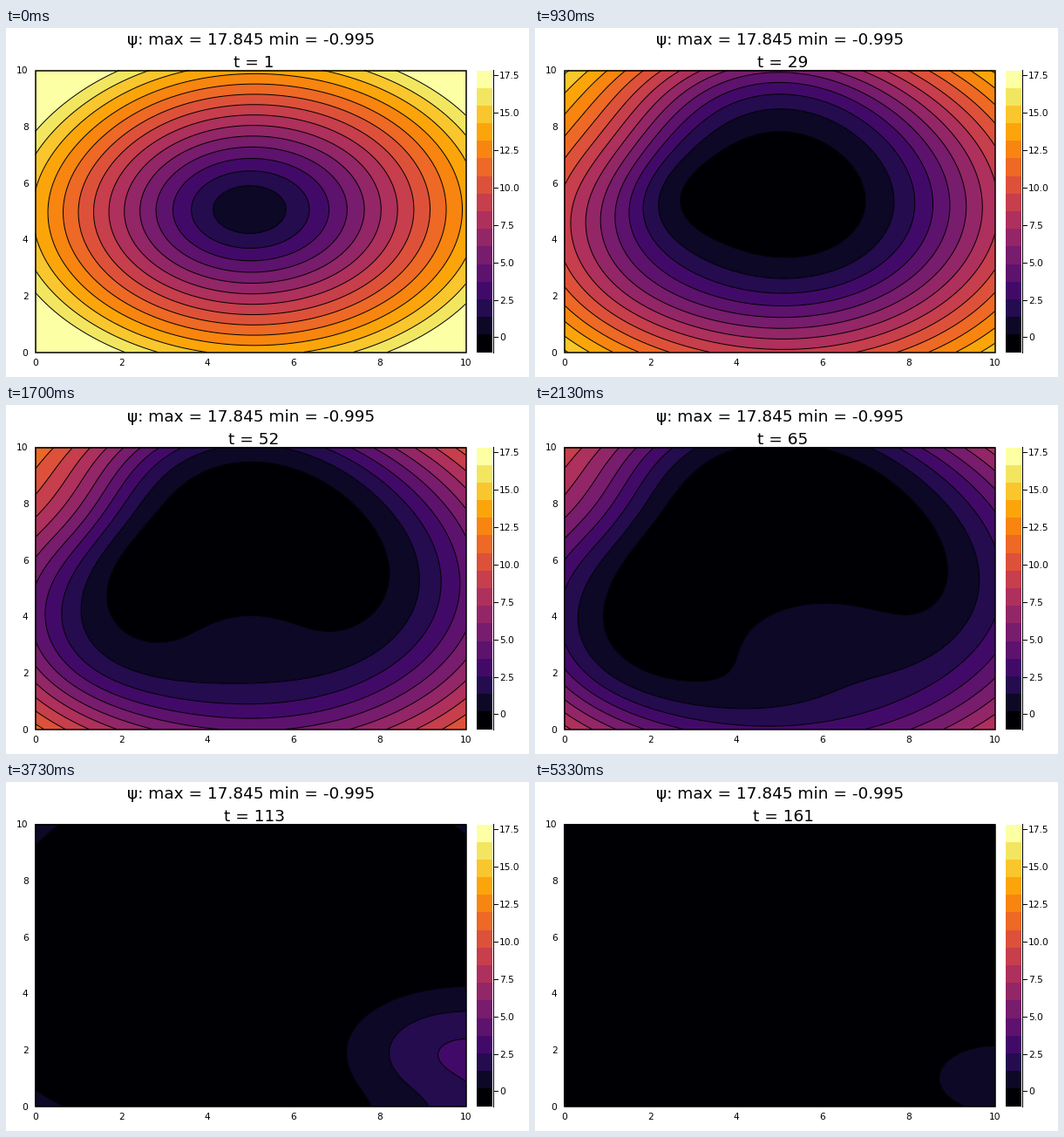
Recreate the animation shown at these times as a matplotlib script. Size 600 by 400 pixels, loop 5.36 s.

```python
import numpy as np
import matplotlib.pyplot as plt
from matplotlib.animation import FuncAnimation
from matplotlib.patches import Rectangle

LOOP_MS, TICK_MS, STEPS = 5360, 20, 161
LEFT, RIGHT, TOP, BOTTOM = 33.5, 527.5, 48.5, 371.5
LOW, HIGH, BANDS = -0.995, 17.845, 16
PX = 0.72  # points per pixel at 100 dpi

plt.rcParams["font.family"] = "DejaVu Sans"
COLORS = plt.cm.inferno(np.linspace(0, 1, BANDS))
x, y = np.meshgrid(np.linspace(0, 10, 90), np.linspace(0, 10, 70))
px = LEFT + x / 10 * (RIGHT - LEFT)
py = BOTTOM - y / 10 * (BOTTOM - TOP)

# Distance from the ignition point, rounded at the tip
CONE = np.sqrt((x - 4.95) ** 2 + (y - 5.06) ** 2 + 0.09) - 0.03 * (x - 5)


def bump(cx, cy, sx, sy):
    return np.exp(-((x - cx) / sx) ** 2 / 2 - ((y - cy) / sy) ** 2 / 2)


HEAD = bump(4.8, 9.0, 2.2, 2.5)
CORE = bump(3.3, 5.3, 1.0, 1.0)
FLANK = bump(1.5, 2.8, 1.6, 1.6)
LAG = bump(1.0, 7.8, 1.7, 1.7)


def field(t):
    """Cone swept outwards by a spreading front, in units of colour bands."""
    age = t - 1
    early = 1 - np.exp(-age / 20)
    late = 1 - np.exp(-(age / 60) ** 2)
    pulse = np.exp(-((t - 60) / 40) ** 2)
    shift = (0.057 * age + early * (1.5 * HEAD + 0.9 * CORE)
             + late * FLANK - 0.9 * pulse * LAG)
    front = 2.77 * 0.71 * np.logaddexp(0, (CONE - shift - 0.5) / 0.71)

    # A slow patch that drifts to the lower right and fades
    strength = 2.9 * np.exp(-((t - 108) / 60) ** 2)
    patch = bump(min(10, 5.2 + 0.078 * (t - 55)), 3.4 - 0.02 * (t - 41), 1.7, 1.5)
    return np.clip(front + strength * early * patch, 0.01, BANDS - 0.01)


fig = plt.figure(figsize=(6, 4), dpi=100, facecolor="white")
ax = fig.add_axes([0, 0, 1, 1])
ax.set_xlim(0, 600)
ax.set_ylim(400, 0)
ax.axis("off")


def label(x, y, s, size=10.67, ha="left"):
    return ax.text(x, y, s, fontsize=size * PX, color="black", ha=ha, va="baseline")


# Frame and axis labels
ax.add_patch(Rectangle((LEFT, TOP), RIGHT - LEFT, BOTTOM - TOP, fill=False,
                       edgecolor="black", linewidth=1.5 * PX, zorder=5))
for v in range(0, 11, 2):
    label(LEFT + v / 10 * (RIGHT - LEFT), 387, str(v), ha="center")
    label(25.5, BOTTOM - v / 10 * (BOTTOM - TOP) + 4, str(v), ha="right")

# Colour bar
step = (BOTTOM - TOP) / BANDS
for i, c in enumerate(COLORS):
    ax.add_patch(Rectangle((540, BOTTOM - (i + 1) * step), 18, step, facecolor=c,
                           linewidth=0, antialiased=False))
ax.plot([558.5, 558.5], [TOP - 0.5, BOTTOM], color="black", lw=PX)
for v in np.arange(0, 18, 2.5):
    ty = BOTTOM - (v - LOW) / (HIGH - LOW) * (BOTTOM - TOP)
    ax.plot([558.5, 563.5], [ty, ty], color="black", lw=PX)
    label(566, ty + 4, f"{v:.1f}" if v else "0")

label(281, 19, f"ψ: max = {HIGH} min = {LOW}", 18.5, "center")
clock = label(284.5, 45, "", 18.5, "center")
shown = []


def draw(n):
    # 30 steps a second, sampled at the middle of each tick
    t = 1 + min(STEPS - 1, round((n + 0.5) * TICK_MS * 0.03))
    text = f"t = {t}"
    if clock.get_text() == text:
        return []
    clock.set_text(text)
    while shown:
        shown.pop().remove()
    z = field(t)
    shown.append(ax.contourf(px, py, z, levels=range(BANDS + 1), colors=COLORS))
    lines = [k for k in range(1, BANDS) if z.min() < k < z.max()]
    if lines:
        shown.append(ax.contour(px, py, z, levels=lines, colors="black",
                                linewidths=PX))
    return []


anim = FuncAnimation(fig, draw, frames=LOOP_MS // TICK_MS, init_func=lambda: [],
                     interval=TICK_MS, repeat=True, blit=False)
plt.show()
```
